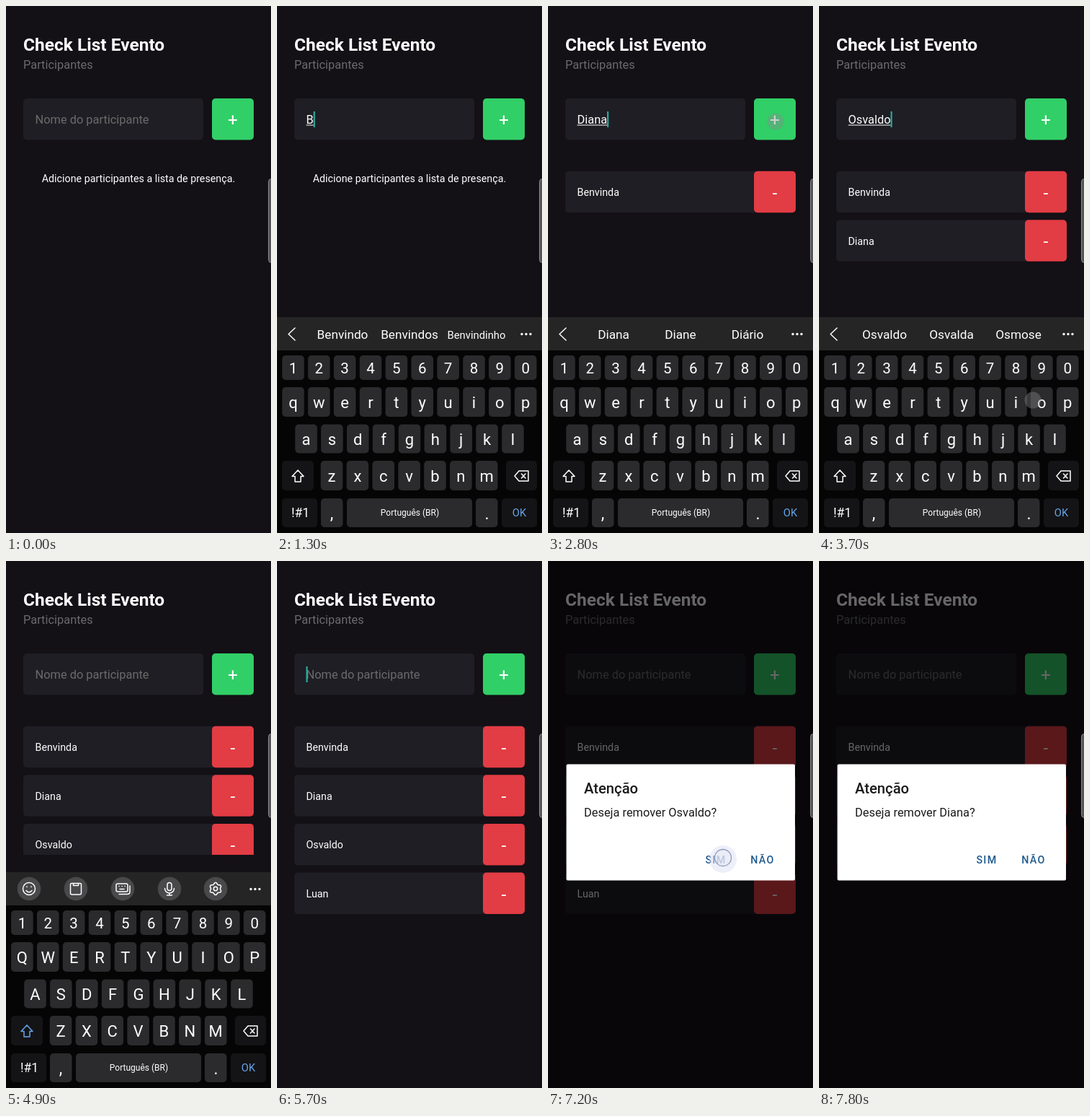
Animation, 368 px wide and 730 px high, one loop 8 s. Source, as an HTML page:

```html
<!DOCTYPE html>
<html lang="pt-BR">
<head>
<meta charset="utf-8">
<title>Check List Evento</title>
<style>
  html, body { margin: 0; width: 100%; height: 100%; overflow: hidden; background: #131016; }
  svg { display: block; width: 368px; height: 730px; font-family: Roboto, sans-serif; }
</style>
</head>
<body>
<svg id="stage" viewBox="0 0 368 730"></svg>
<script>
const LOOP = 8000, STEP = 100;
const stage = document.getElementById('stage');
const ruler = document.createElement('canvas').getContext('2d');

const rect = (x, y, w, h, fill, r = 0, extra = '') =>
  `<rect x="${x}" y="${y}" width="${w}" height="${h}" rx="${r}" fill="${fill}" ${extra}/>`;
const text = (x, y, size, str, fill = '#fff', extra = '') =>
  `<text x="${x}" y="${y}" font-size="${size}" fill="${fill}" ${extra}>${str}</text>`;
const centered = (x, y, size, str, fill = '#fff') =>
  text(x, y, size, str, fill, 'text-anchor="middle"');
const circle = (x, y, r, fill, extra = '') =>
  `<circle cx="${x}" cy="${y}" r="${r}" fill="${fill}" ${extra}/>`;
const line = (d, color = '#fff', width = 1.5) =>
  `<path d="${d}" fill="none" stroke="${color}" stroke-width="${width}" stroke-linejoin="round" stroke-linecap="round"/>`;
const textWidth = (str, size) => {
  ruler.font = `${size}px Roboto, sans-serif`;
  return ruler.measureText(str).width;
};

// Timeline: each entry changes part of the state from its time on.
const NAMES = ['Benvinda', 'Diana', 'Osvaldo', 'Luan'];
const PLUS = [316, 160];
const typing = (word, start, hints) => [...word].map((_, i) =>
  [start + i * 100, { input: word.slice(0, i + 1), hints, caret: true, touch: null }]);
const added = (time, count) =>
  [time, { input: '', hints: null, caret: true, touch: null, items: NAMES.slice(0, count) }];

const timeline = [
  [0, { input: '', hints: null, caret: false, touch: null, items: [], keyboard: false, ask: '', dim: 0 }],
  [300, { touch: [150, 160] }],
  [400, { caret: true }],
  [500, { touch: null }],
  [1000, { caret: false }],
  [1200, { keyboard: true, caret: true }],
  ...typing(NAMES[0], 1300, ['Benvindo', 'Benvindos', 'Benvindinho']),
  [2100, { touch: PLUS }],
  added(2200, 1),
  ...typing(NAMES[1], 2300, ['Diana', 'Diane', 'Diário']),
  [2800, { touch: PLUS }],
  added(2900, 2),
  ...typing(NAMES[2], 3100, ['Osvaldo', 'Osvalda', 'Osmose']),
  [3700, { touch: [297, 546] }],
  [3800, { touch: null }],
  [4000, { touch: PLUS }],
  added(4100, 3),
  [4600, { caret: false }],
  ...typing(NAMES[3], 5000, ['Luan', 'Luana', 'Luar']),
  added(5500, 4),
  [5600, { keyboard: false }],
  [6100, { caret: false }],
  [6300, { touch: [315, 394] }],
  [6400, { touch: null, ask: NAMES[2], dim: 0.4 }],
  [6500, { dim: 0.85 }],
  [6600, { dim: 1 }],
  [7200, { touch: [243, 411] }],
  [7300, { touch: null, dim: 0.4, items: [NAMES[0], NAMES[1], NAMES[3]] }],
  [7400, { dim: 0 }],
  [7600, { touch: [315, 326] }],
  [7700, { touch: null, ask: NAMES[1], dim: 0.6 }],
  [7800, { dim: 1 }],
];
const stateAt = time =>
  Object.assign({}, ...timeline.filter(([at]) => at <= time).map(([, change]) => change));

function header({ input, caret }) {
  const width = textWidth(input, 16.4);
  return text(24, 62, 24.5, 'Check List Evento', '#fff', 'font-weight="700"')
    + text(24, 87, 16.4, 'Participantes', '#6b6b6b')
    + rect(24, 128, 250, 57.5, '#1f1e25', 5)
    + rect(286, 128, 58, 57.5, '#31cf67', 5)
    + centered(315, 166.3, 24.5, '+')
    + (input ? text(40.5, 163, 16.4, input) + rect(40.5, 164.5, width, 1, '#fff')
             : text(40.5, 163, 16.4, 'Nome do participante', '#6b6b6b'))
    + (caret ? rect(40.5 + width, 146, 2, 22, '#2ab5a5') : '');
}

function list({ items, keyboard }) {
  if (!items.length)
    return centered(184, 244, 14.27, 'Adicione participantes a lista de presença.');
  const rows = items.map((name, i) => {
    const y = 228.7 + i * 67.6;
    return rect(24, y, 270, 57.5, '#1f1e25', 5)
      + rect(286, y, 58, 57.5, '#e23c44', 5)
      + text(40.5, y + 34.2, 14.27, name)
      + centered(315, y + 38, 24.5, '-');
  }).join('');
  const bottom = keyboard ? 407 : 730;
  return `<clipPath id="view"><path d="M0 220H368V${bottom}H0z"/></clipPath><g clip-path="url(#view)">${rows}</g>`;
}

function toolIcons() {
  const gear = Array.from({ length: 48 }, (_, i) => {
    const a = i / 48 * Math.PI * 2, r = 7.5 + 1.1 * Math.cos(6 * a);
    return `${(291 + r * Math.sin(a)).toFixed(1)} ${(454 - r * Math.cos(a)).toFixed(1)}`;
  }).join('L');
  return [32, 97, 162, 227, 291].map(x => circle(x, 454, 16.3, '#49494b')).join('')
    + line('M40.5 454a8.5 8.5 0 1 1-17 0a8.5 8.5 0 1 1 17 0M28 456.5q4 4.5 8 0M29 451v.6M35 451v.6')
    + line('M91 446.5h12a1.5 1.5 0 0 1 1.5 1.5v12a2 2 0 0 1-2 2h-11a2 2 0 0 1-2-2v-12a1.5 1.5 0 0 1 1.5-1.5zM93.5 446.5v3h7v-3')
    + line('M155 447h12q2 0 2 2v7q0 2-2 2h-12q-2 0-2-2v-7q0-2 2-2zM172 450v8q0 3.5-3.5 3.5H157M157 450.5h.2M161 450.5h.2M165 450.5h.2M158 454.5h6')
    + line('M227 445.5a3 3 0 0 1 3 3v5a3 3 0 0 1-6 0v-5a3 3 0 0 1 3-3zM220.500 453.500a6.500 6.500 0 0 0 13 0M227 460v3M223.500 463h7')
    + line(`M${gear}Z`) + circle(291, 454, 2.7, 'none', 'stroke="#fff" stroke-width="1.5"');
}

function hintBar(hints) {
  return line('M25 446L16 454.5L25 463')
    + hints.map((word, i) => centered(91 + i * 93, 460.5, word.length > 9 ? 14.8 : 17.2, word)).join('');
}

function keyboard({ hints, input }) {
  const upper = !input, KEY = '#2b2b2d', DARK = '#141416', BLUE = '#64a5ea';
  const row = (chars, x, y, h, size) => [...chars].map((char, i) => {
    const cx = x + i * 35.87;
    return rect(cx - 15.3, y, 30.6, h, KEY, 5)
      + centered(cx, y + h / 2 + 8, size, upper ? char.toUpperCase() : char);
  }).join('');
  return rect(0, 477, 368, 253, '#050505')
    + rect(0, 431, 368, 46, '#252525')
    + (hints ? hintBar(hints) : toolIcons())
    + [340, 346, 352].map(x => circle(x, 454.5, 1.7, '#fff')).join('')
    + row('1234567890', 22.4, 484, 34, 20.5)
    + row('qwertyuiop', 22.4, 528, 41, 22)
    + row('asdfghjkl', 40.5, 579.5, 40, 22)
    + row('zxcvbnm', 76, 630, 41, 22)
    + rect(7, 630, 44, 41, DARK, 5)
    + line('M29 643L37 651.5H33V659H25V651.5H21Z', upper ? BLUE : '#fff')
    + rect(318, 630, 43, 41, DARK, 5)
    + line('M330 651L336 644H349V658H336ZM339.5 648l5.5 6M345 648l-5.500 6')
    + rect(7, 682, 49, 40, DARK, 5) + centered(32.5, 708, 17.5, '!#1')
    + rect(61, 682, 30.5, 40, KEY, 5) + centered(76, 711, 23, ',')
    + rect(97, 682, 174, 40, KEY, 5) + centered(184.5, 706, 12, 'Português (BR)')
    + rect(276, 682, 30.5, 40, KEY, 5) + centered(291.5, 711, 23, '.')
    + rect(312, 682, 49, 40, DARK, 5) + centered(336.5, 707, 14.7, 'OK', BLUE);
}

function dialog({ ask, dim }) {
  const button = (x, label) =>
    text(x, 419, 14.27, label, '#1f5a8e', 'font-weight="500" letter-spacing="1.25"');
  return rect(0, 0, 368, 730, '#000', 0, `opacity="${0.6 * dim}"`)
    + `<g opacity="${dim}">`
    + rect(25.5, 281.5, 317.5, 161, '#fff', 2)
    + text(50, 322, 20.2, 'Atenção', '#1b1b1b', 'font-weight="500"')
    + text(50, 354, 16.4, `Deseja remover ${ask}?`, '#1b1b1b')
    + button(218.5, 'SIM') + button(281.3, 'NÃO')
    + '</g>';
}

function finger({ touch: [x, y], dim }) {
  return dim
    ? circle(x, y + 2, 19, '#dfe2f5', 'opacity=".55"')
      + circle(x, y, 11.5, '#e8eaf6', 'fill-opacity=".55" stroke="#8f9bb8" stroke-width="1.3"')
    : circle(x, y, 11.5, '#8a8a8c', 'opacity=".4"');
}

function scene(state) {
  return rect(0, 0, 368, 730, '#131016')
    + header(state) + list(state)
    + (state.keyboard ? keyboard(state) : '')
    + (state.dim ? dialog(state) : '')
    + (state.touch ? finger(state) : '')
    + rect(364.5, 239.5, 10, 116, '#555557', 4, 'stroke="#858587"');
}

const start = performance.now();
let shown = -1;
function frame() {
  const elapsed = (performance.now() - start) % LOOP;
  const time = Math.floor(elapsed / STEP) * STEP;
  if (time !== shown) {
    shown = time;
    stage.innerHTML = scene(stateAt(time));
  }
  requestAnimationFrame(frame);
}
frame();
</script>
</body>
</html>
```
